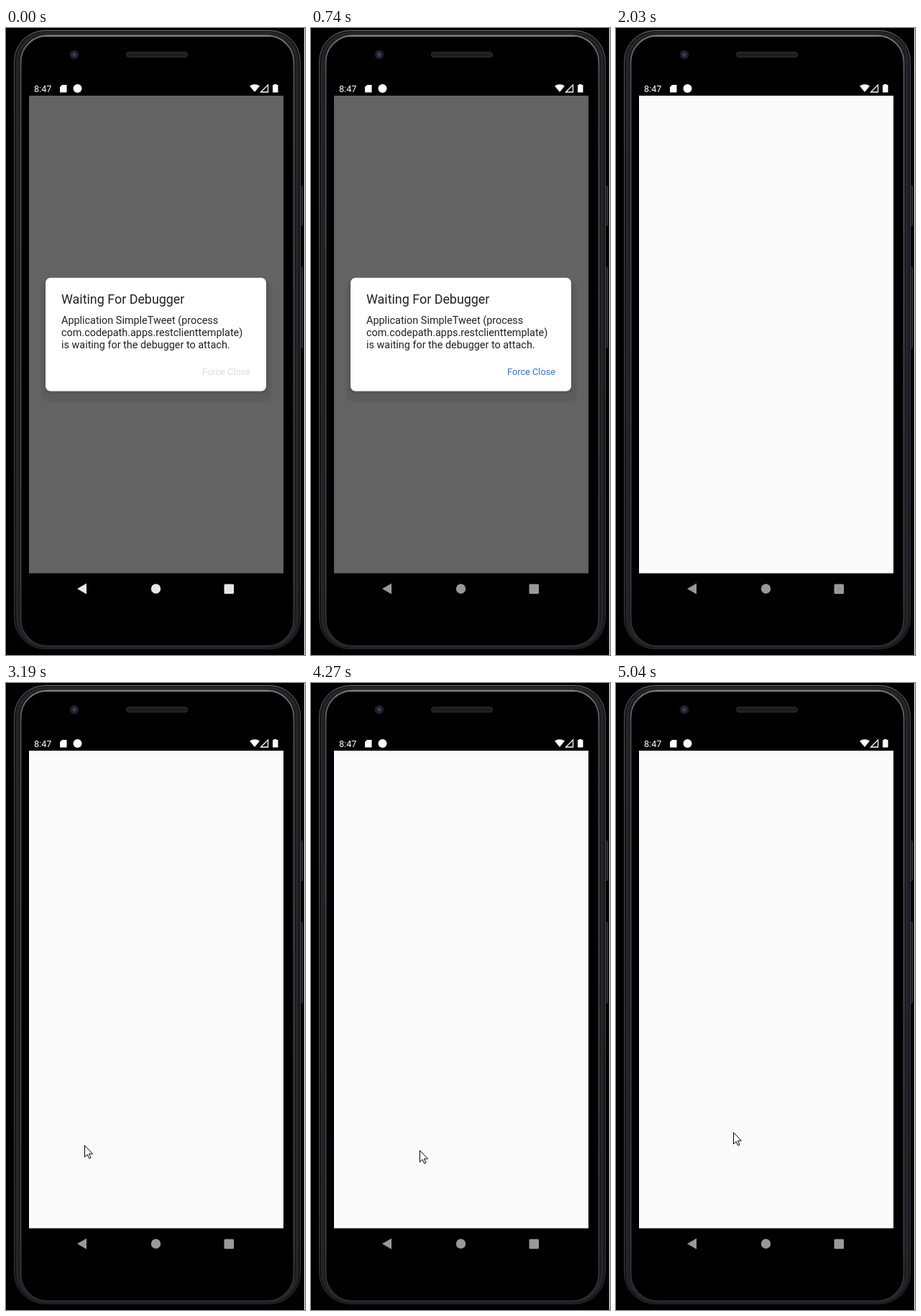
An HTML page for the animation above (8000 ms loop, 416 by 871 pixels).

```html
<!DOCTYPE html>
<html lang="en">
<head>
<meta charset="utf-8">
<title>Phone waiting for debugger</title>
<style>
  html, body { margin: 0; width: 100%; height: 100%; overflow: hidden; background: #000; }
  svg { display: block; width: 416px; height: 871px; font-family: Roboto, sans-serif; }
  .anim { animation: 8s step-end infinite; }
  .nav { animation-name: nav; }
  .action { animation-name: action; }
  .dim { animation-name: dim; }
  .shadow { animation-name: shadow; }
  .dialog { animation-name: dialog; }
  .cursor { animation-name: cursor; }

  @keyframes nav {
    0% { fill: #e6e6e6; }
    1.5% { fill: #c4c4c4; }
    3% { fill: #a6a6a6; }
    4.75% { fill: #a1a1a1; }
    6.25% { fill: #9d9d9d; }
    9.25%, 100% { fill: #999; }
  }
  @keyframes action {
    0% { fill: #dcdcdc; }
    1.5% { fill: #82abe5; }
    3%, 100% { fill: #2a73d8; }
  }
  @keyframes dim {
    0% { fill: #636363; }
    23.875% { fill: #777; }
    25.375%, 100% { fill: #fafafa; }
  }
  @keyframes shadow {
    0% { opacity: 1; }
    23.875%, 100% { opacity: 0; }
  }
  @keyframes dialog {
    0% { opacity: 1; }
    23.875% { opacity: .42; }
    25.375%, 100% { opacity: 0; }
  }
  @keyframes cursor {
    0% { opacity: 0; transform: translate(109px, 642px); }
    39.875% { opacity: 1; transform: translate(109px, 642px); }
    41.625% { opacity: 1; transform: translate(134px, 642px); }
    43.25% { opacity: 1; transform: translate(144px, 642px); }
    48% { opacity: 1; transform: translate(145px, 644px); }
    49.5% { opacity: 1; transform: translate(147px, 647px); }
    51.5% { opacity: 1; transform: translate(149px, 649px); }
    53.375% { opacity: 1; transform: translate(151px, 649px); }
    59.625% { opacity: 1; transform: translate(159px, 636px); }
    61.5% { opacity: 1; transform: translate(162px, 627px); }
    63%, 100% { opacity: 1; transform: translate(163px, 624px); }
  }
</style>
</head>
<body>
<svg viewBox="0 0 416 871">
  <defs>
    <linearGradient id="rim" x2="0" y2="1">
      <stop offset="0" stop-color="#77777c"/>
      <stop offset=".06" stop-color="#4b4b52"/>
      <stop offset=".9" stop-color="#3c3c42"/>
      <stop offset="1" stop-color="#2c2c30"/>
    </linearGradient>
    <filter id="soft"><feGaussianBlur stdDeviation="1"/></filter>
  </defs>

  <rect width="416" height="871"/>
  <rect x="415" width="1" height="871" fill="#fff"/>

  <!-- phone body -->
  <g fill="#1c1c1e" stroke="#3a3a3d">
    <rect x="408.5" y="219.5" width="4" height="55" rx="1"/>
    <rect x="408.5" y="332.5" width="4" height="112" rx="1"/>
    <rect x="11.5" y="3.5" width="398" height="859" rx="43" fill="#151517" stroke="url(#rim)"/>
  </g>
  <g fill="none">
    <rect x="16" y="7" width="389" height="852" rx="40" stroke="#252528" stroke-width="4"/>
    <rect x="20.5" y="10.5" width="380" height="848" rx="37" fill="#000" stroke="url(#rim)" stroke-width="2"/>
    <path d="M48 11.5H368" stroke="#8a8a90"/>
  </g>
  <circle cx="95" cy="37" r="6.5" fill="#1b1b22"/>
  <circle cx="95" cy="37" r="4" fill="#29293d"/>
  <circle cx="95" cy="37" r="1.5" fill="#52527c"/>
  <rect x="167.5" y="33.5" width="85" height="7" rx="3.5" fill="#1d1d1d" stroke="#303030"/>

  <!-- status bar -->
  <g fill="#fff">
    <text x="39" y="88.5" font-size="12.6">8:47</text>
    <path d="M78 79h6.5v10.5h-9.500v-7.500z"/>
    <circle cx="99.5" cy="84" r="6"/>
    <path d="M339 80.500q7-4.500 14 0l-7 8.500z"/>
    <path d="M364.500 79v10h-10z" fill="none" stroke="#fff" stroke-width="1.300"/>
    <path d="M373 79v-1h3.500v1h2v10.500h-7.500v-10.500z"/>
  </g>

  <!-- screen -->
  <rect class="anim dim" x="32" y="94" width="354" height="663.5"/>
  <g class="anim shadow">
    <rect x="49.500" y="351" width="320" height="168" rx="11" fill="#5b5b5b" filter="url(#soft)"/>
    <rect x="53" y="349" width="311" height="159" rx="9" fill="#545454" filter="url(#soft)"/>
  </g>
  <g class="anim dialog" fill="#212121">
    <rect x="55" y="347" width="307" height="157.500" rx="7" fill="#fff"/>
    <text x="77" y="383" font-size="17.9">Waiting For Debugger</text>
    <g font-size="14.4">
      <text x="77" y="410.500">Application SimpleTweet (process</text>
      <text x="77" y="427.500">com.codepath.apps.restclienttemplate)</text>
      <text x="77" y="444.500">is waiting for the debugger to attach.</text>
    </g>
    <text class="anim action" x="273" y="482" font-size="12.75">Force Close</text>
  </g>

  <!-- navigation bar -->
  <g class="anim nav">
    <path d="M99 779l13-7.500v15z"/>
    <circle cx="208.500" cy="779" r="6.700"/>
    <rect x="303.500" y="772.500" width="13.500" height="13.500" rx="1.500"/>
  </g>

  <path class="anim cursor" d="M.5 .5v16l3.700-3.500 2.500 5.500 2.300-1-2.500-5.500h5z" fill="#fff" stroke="#000"/>
</svg>
</body>
</html>
```
